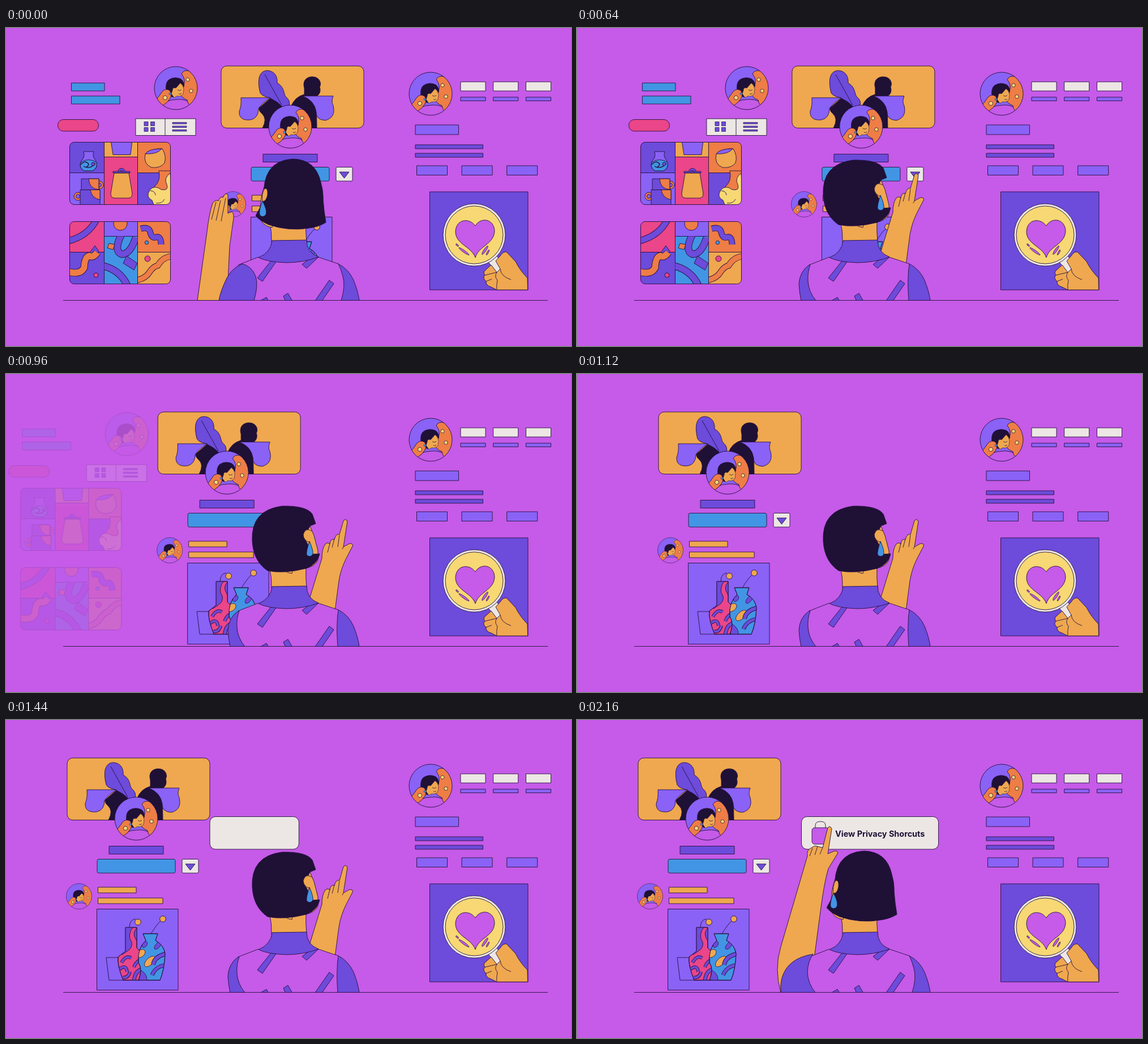
An HTML page with a canvas that plays this animation: 998x561 px, repeating every 2.24 s.

```html
<!DOCTYPE html>
<html lang="en">
<head>
<meta charset="utf-8">
<title>Privacy shortcuts</title>
<style>
html, body { margin: 0; width: 100%; height: 100%; overflow: hidden; background: #c55be8; }
canvas { display: block; }
</style>
</head>
<body>
<canvas id="stage" width="998" height="561"></canvas>
<script>
const W = 998, H = 561, LOOP = 2240, STEP = 80;
const BG = '#c55be8', INK = '#26103f', NIGHT = '#1f1036', VIOLET = '#6d4bdb', LILAC = '#8a62f6',
  BLUE = '#4295e4', SKIN = '#efa84f', RUST = '#ee7d46', PINK = '#ea4689', CREAM = '#ece7e4', YELLOW = '#f7d874';

const stage = document.getElementById('stage').getContext('2d');
let g = stage;

// ---- drawing helpers ----
function paint(p, fill, line = 0.9) {
  if (fill) { g.fillStyle = fill; g.fill(p); }
  if (line) { g.strokeStyle = INK; g.lineWidth = line; g.stroke(p); }
}
const shape = (d, fill, line) => paint(new Path2D(d), fill, line);
function box(x, y, w, h, fill, r = 0, line) {
  const p = new Path2D();
  p.roundRect(x, y, w, h, r);
  paint(p, fill, line);
}
function disc(x, y, r, fill, line) {
  const p = new Path2D();
  p.arc(x, y, r, 0, 7);
  paint(p, fill, line);
}
function oval(x, y, rx, ry, turn, fill) {
  const p = new Path2D();
  p.ellipse(x, y, rx, ry, turn, 0, 7);
  paint(p, fill, 0.8);
}
function band(d, w, fill) {
  const p = new Path2D(d);
  g.strokeStyle = INK; g.lineWidth = w + 1.8; g.stroke(p);
  g.strokeStyle = fill; g.lineWidth = w; g.stroke(p);
}
function group(dx, dy, draw) {
  g.save();
  g.translate(dx, dy);
  draw();
  g.restore();
}
function inside(p, draw) {
  g.save();
  g.clip(p);
  draw();
  g.restore();
}
function rounded(x, y, w, h, r) {
  const p = new Path2D();
  p.roundRect(x, y, w, h, r);
  return p;
}

// ---- motion helpers ----
const ramp = (t, a, b) => Math.min(1, Math.max(0, (t - a) / (b - a)));
const smooth = u => u < 0.5 ? 4 * u ** 3 : 1 - 4 * (1 - u) ** 3;
const ease = (t, a, b) => smooth(ramp(t, a, b));
function mix(a, b, k) {
  const nums = b.match(/[\d.]+/g);
  let i = 0;
  return a.replace(/[\d.]+/g, n => (+n + (nums[i++] - n) * k).toFixed(2));
}

// ---- scenery ----
function avatar(x, y, r = 38) {
  g.save();
  g.translate(x, y);
  g.scale(r / 38, r / 38);
  const ring = new Path2D();
  ring.arc(0, 0, 38, 0, 7);
  paint(ring, LILAC, 0);
  inside(ring, () => {
    shape('M-34 40 Q-22 20 2 20 Q26 18 34 40Z', BG);
    shape('M10 -25 Q14 -33 24 -30 Q36 -30 42 -18 L42 20 Q36 34 30 33 Q22 32 20 21 Q10 17 8 10 L14 -4 Q18 -16 10 -25Z', RUST);
    shape('M-17 4 Q-19 -10 -12 -15 Q-2 -21 9 -16 Q16 -10 14 -2 L4 0 Q0 6 -4 16 Q-14 14 -17 4Z', NIGHT);
    shape('M-6 4 Q-6 -2 0 0 L8 -9 Q14 -4 14 2 L13 10 Q9 16 2 14 L-3 17 L-8 10Z', SKIN, 0.6);
    shape('M3 3 Q6 6 10 3 M5 10 Q8 12 10 9', null, 0.8);
    shape('M-42 26 Q-30 17 -24 6 Q-18 0 -11 4 Q-6 10 -10 18 Q-18 32 -42 38Z', RUST);
    disc(-10, 10, 2, BLUE, 0.5);
    disc(21, -15, 3.2, YELLOW, 0.8);
    disc(27, 5, 3.2, YELLOW, 0.8);
    disc(-19, 17, 3.6, YELLOW, 0.8);
  });
  paint(ring, null);
  g.restore();
}

function pottery() {
  box(112.5, 201.5, 61, 54, VIOLET);
  box(112.5, 255.5, 61, 56, LILAC);
  box(173.5, 201.5, 59, 26, SKIN);
  box(173.5, 227.5, 59, 84, PINK);
  box(232.5, 201.5, 58, 54, RUST);
  box(232.5, 255.5, 58, 56, VIOLET);
  shape('M137 218 L155 218 Q152 227 158 233 Q165 246 153 252 L138 252 Q127 246 133 234 Q140 228 137 218Z', LILAC);
  shape('M132 237 Q146 228 160 237 Q162 247 153 252 L138 252 Q129 247 132 237Z', BLUE);
  shape('M132 241 Q140 232 146 240 Q144 248 137 244 Q148 250 158 239', null, 1.4);
  disc(154, 240, 3, VIOLET);
  disc(127, 297, 7, RUST);
  disc(127, 297, 3.5, LILAC);
  disc(165, 277, 7, RUST);
  disc(165, 277, 3.5, LILAC);
  box(131, 285.5, 35, 27, VIOLET);
  box(133, 266, 31, 19.5, VIOLET);
  shape('M164 266 L164 285 Q147 284 146 266Z', RUST);
  shape('M166 285.5 L149 285.5 Q151 300 166 303Z', RUST);
  shape('M185 198 L223 198 L220 223.5 L189 223.5Z', LILAC);
  disc(204, 254, 6.5, VIOLET);
  disc(204, 255, 3.5, PINK);
  shape('M191 256 L217 256 L223 292 Q223 300 216 300 L192 300 Q185 300 185 292Z', SKIN);
  box(189, 253, 30, 2.5, VIOLET);
  shape('M246 222 Q258 212 276 213 Q284 226 280 238 Q272 248 257 246 Q242 240 246 222Z', SKIN);
  shape('M246 222 Q252 213 275 213 Q268 223 246 222Z', LILAC);
  shape('M270 252 Q274 270 262 280 Q268 292 292 290 L292 252Z', RUST);
  shape('M290 256 Q278 265 284 276 Q288 288 274 285 Q262 276 254 286 Q246 298 258 304 L262 314 L294 314Z', YELLOW);
  shape('M255 287 Q264 288 264 295 M265 309 Q276 310 280 302', null);
}

function patterns() {
  box(112.5, 341.5, 61, 54, PINK);
  box(112.5, 395.5, 61, 57, VIOLET);
  box(173.5, 341.5, 59, 26, LILAC);
  box(173.5, 367.5, 59, 85, BLUE);
  box(232.5, 341.5, 58, 54, RUST);
  box(232.5, 395.5, 58, 57, SKIN);
  inside(rounded(112.5, 341.5, 60.5, 54, 0), () => band('M108 376 Q145 368 161 336', 10, VIOLET));
  inside(rounded(112.5, 380, 60.5, 80, 0), () => {
    shape('M146 399 L157 384 L164 394 L158 404Z', VIOLET);
    band('M110 430 Q131 436 138 423 Q139 404 147 402 Q154 406 161 396', 11, RUST);
    disc(159, 436, 4, PINK);
  });
  inside(rounded(173.5, 341.5, 59, 26, 0), () => disc(202, 345, 12, RUST));
  inside(rounded(173.5, 367.5, 59, 90, 0), () => {
    band('M205 362 Q189 393 204 399 Q219 400 229 370', 11, VIOLET);
    band('M168 419 Q203 426 216 458', 11, VIOLET);
    shape('M213 402 L232 415 L226 427 L207 415Z', VIOLET);
    shape('M182 380 L192 382 L189 391 L179 388Z', RUST);
  });
  band('M238 354 Q253 350 255 361 Q258 372 265 369 Q274 367 274 382', 9, VIOLET);
  disc(248.5, 378.5, 3.2, BLUE);
  inside(rounded(233, 396, 58, 60, 0), () => {
    band('M230 445 Q247 442 254 430 Q260 421 268 419 Q278 403 294 403', 9, RUST);
    disc(250, 407, 5, PINK);
  });
}

function leftPanel() {
  box(115.5, 97, 58.5, 14, BLUE);
  box(115.5, 120, 85.5, 14, BLUE);
  avatar(300, 106);
  box(91.5, 161.5, 72, 20.5, PINK, 10);
  box(229, 160, 106, 29.5, CREAM);
  shape('M281 160 V189', null);
  for (const x of [244, 255.5]) for (const y of [165.5, 175.5]) box(x, y, 7, 7, VIOLET, 0, 0.7);
  for (const y of [166.5, 173, 179.5]) box(294, y, 25, 2.6, VIOLET, 0, 0.7);
  for (const [y, art] of [[201.5, pottery], [341.5, patterns]]) {
    const frame = rounded(112.5, y, 178, 110, 8);
    inside(frame, art);
    paint(frame, null);
  }
}

function vases() {
  shape('M177 419 L203 419 L214 459 L182 459Z', LILAC);
  shape('M218 366 Q218 352 229 351 M256 377 Q268 358 273 355', null);
  disc(233, 356.5, 5.3, SKIN);
  disc(277, 351, 5.3, SKIN);
  const pink = new Path2D('M211 366 L231 366 L231 402 Q242 412 242 422 L235 459 L207 459 Q196 432 198 418 L211 408Z');
  paint(pink, PINK);
  inside(pink, () => {
    shape('M208 364 L225 364 Q213 380 222 392 Q224 402 214 408 L205 414Z', VIOLET);
    shape('M234 364 L231 367 Q222 376 230 388 L234 394Z', VIOLET);
    band('M204 428 Q212 414 221 420', 4, VIOLET);
    band('M200 440 Q212 430 214 444', 4, VIOLET);
    band('M244 420 Q230 424 226 436', 4, VIOLET);
    band('M206 454 Q216 456 219 444', 4, VIOLET);
    band('M240 440 Q228 442 226 460', 5, VIOLET);
  });
  paint(pink, null);
  const blue = new Path2D('M242 377 L268 377 L264 389 Q278 396 281 412 Q280 440 272 459 L234 459 Q242 440 234 428 Q232 402 247 389Z');
  paint(blue, BLUE);
  inside(blue, () => {
    oval(245, 396, 4, 6, 0.6, VIOLET);
    oval(268, 398, 4, 8, 0.7, VIOLET);
    oval(238, 412, 6, 9, 0.9, SKIN);
    oval(254, 426, 6, 12, 0.8, SKIN);
    band('M286 412 Q262 416 260 432', 6, VIOLET);
    band('M284 432 Q264 434 258 450', 5, VIOLET);
    oval(240, 452, 7, 12, -0.6, VIOLET);
  });
  paint(blue, null);
}

function centerPanel() {
  box(380, 67, 252, 109.5, SKIN, 10);
  shape('M448 110 C443 86 450 75 462 75 C476 76 480 88 479 97 C492 104 490 115 494 121 Q503 128 500 138 L485 142 Q470 133 466 123 Q448 120 448 110Z', VIOLET);
  shape('M457 82 L487 136', null);
  shape('M467 124 Q480 130 487 138 L500 176.5 L453 176.5 Q462 160 452 151 Q446 146 447 141Z', NIGHT);
  shape('M527 106 C523 92 532 86 541 86 C554 86 558 98 554 104 C557 112 553 118 548 121 L549 176.5 L500 176.5 L503 140 Q509 122 527 117Z', NIGHT);
  shape('M415 123 L467 123 Q452 133 446 142 Q446 159 432 162 Q411 164 412 147 Q416 138 415 123Z', LILAC);
  shape('M524 120 L578 120 Q574 130 578 137 Q583 158 564 163 Q547 162 548 148 Q545 128 524 120Z', LILAC);
  avatar(502, 174);
  box(454, 222.5, 96, 14, VIOLET);
  box(433, 245.5, 138, 24.5, BLUE, 3);
  box(583, 245.5, 29, 24.5, CREAM, 2);
  shape('M589 254 H606 L597.5 265Z', VIOLET);
  avatar(401, 311, 22.5);
  box(434.5, 295, 67.5, 10, SKIN);
  box(434.5, 314, 114.5, 10, SKIN);
  box(432.5, 333.5, 143.5, 143, LILAC);
  group(272, 0, vases);
}

function rightPanel() {
  avatar(750, 116);
  for (const x of [803, 860.7, 918.5]) {
    box(x, 95, 44, 16, CREAM);
    box(x, 122, 44, 6.5, LILAC);
  }
  box(723, 171, 76.5, 17, LILAC);
  box(723, 206, 119.5, 7, VIOLET);
  box(723, 221, 119.5, 7, VIOLET);
  for (const x of [725.5, 805, 884.7]) box(x, 243, 54, 16.5, LILAC);
  box(748.5, 289, 173.5, 173, VIOLET);
  shape('M852 413 L865 400 L880 418 L867 432Z', CREAM);
  disc(827, 365, 55, CREAM);
  disc(827, 365, 51, YELLOW);
  shape('M829 405 C822 385 794 382 794 359 C795 337 818 334 829 349 C838 333 862 336 863 358 C862 382 835 384 829 405Z', BG);
  oval(809, 394, 1.8, 11, -0.95, BG);
  oval(797, 383, 1.3, 3, -0.8, BG);
  oval(846, 392, 2, 9, 0.6, BG);
  oval(851, 396, 1.3, 5, 0.5, BG);
  shape('M884 395 Q878 394 873 402 L865 411 L873 425 L867 431 L857 418 L847 427 Q842 431 846 436 Q841 441 848 447 Q847 454 857 457 L867 462 L921.5 462 L921 441 Q908 428 900 412Z', SKIN);
  shape('M846 436 L867 431 Q862 438 868 445 M848 447 L858 443 M868 445 Q866 455 867 462 M873 425 Q874 438 892 444', null);
}

// ---- pop-up ----
function popup(t) {
  if (t < 1280) return;
  const open = 1 - (1 - ramp(t, 1280, 1660)) ** 1.92;
  g.save();
  g.globalAlpha = ramp(t, 1240, 1360);
  box(396.5 - 104 * (1 - open), 170.5, 242 * open, 57.5, CREAM, Math.min(10, 121 * open));
  g.globalAlpha = ramp(t, 1520, 1680);
  shape('M421 191 V186 Q421 179 430 179 Q439 179 439 186 V191', CREAM);
  box(415, 190, 30, 29, BG, 5);
  g.fillStyle = NIGHT;
  g.font = '700 14.4px Inter, sans-serif';
  g.fillText('View Privacy Shorcuts', 456, 206);
  g.restore();
}

// ---- woman ----
const HAIR = {
  left: 'M456 304 Q450 234 507 231 Q547 232 556 272 L559 285 L560 295 Q560 305 561 312 Q562 325 564 336 L565 343 Q552 351 535 353 Q500 359 464 347 Q448 340 441 331Z',
  right: 'M435 295 Q432 240 488 233 Q530 232 541 247 L547 264 L537 268 Q530 280 528 292 Q534 300 540 318 L554 317 Q551 335 530 343 Q490 353 462 347 Q437 330 435 295Z'
};
const SLEEVE = {
  hold: 'M417 416 Q395 425 385 452 Q378 468 376 481 L438 481 Q446 455 441 438 Q434 420 417 416Z',
  turned: 'M410 418 Q393 430 392 452 Q393 468 396 481 L422 481 Q409 465 408 447 Q407 430 412 418Z',
  reach: 'M414 414 Q372 420 366 452 Q363 468 367 481 L420 481 Q408 465 407 445 Q407 425 414 414Z',
  press: 'M417 413 Q372 420 362 455 Q358 470 361 481 L421 481 Q408 465 407 445 Q408 425 417 413Z',
  right: 'M587 416 Q605 425 614 445 Q622 465 624 481 L592 481 Q600 455 595 438 Q592 426 587 416Z',
  rightTurned: 'M587 416 Q605 425 614 445 Q622 465 624 481 L586 481 Q584 455 585 440 Q585 428 587 416Z'
};
const ARM = {
  hold: 'M338 481 L355 360 Q359 326 365 309 Q370 302 375 305 Q379 296 383 299 Q388 289 392 294 L392 312 L392 327 L399 324 Q404 328 401 342 L395 385 L393 425 L391 481Z',
  holdLines: 'M363 338 L371 307 M371 340 L379 304 M380 341 L388 300',
  reach: 'M376 435 Q378 425 382 405 L428 240 Q430 230 435 220 L445 210 L455 214 L462 203 Q467 199 468 206 L463 246 L468 236 Q476 232 474 240 L456 275 Q451 290 450 330 L443 405Z',
  press: 'M360 481 Q348 440 360 400 L407 240 Q405 230 413 226 L420 222 L434 225 L443 190 Q447 185 450 192 L443 236 L455 231 Q462 231 460 236 L444 262 Q437 285 431 330 L419 420Z',
  reachLines: 'M436 240 L445 214 M446 244 L456 214 M455 246 L464 220',
  pressLines: 'M411 240 L416 226 M420 238 L425 223 M429 237 L434 225',
  point: 'M535 400 L558 325 Q558 308 564 300 Q568 296 572 300 Q573 290 580 292 Q583 281 589 283 L596 259 Q600 254 603 260 L596 305 L607 299 Q614 299 612 304 L601 325 Q591 345 588 365 L581 418 L560 425Z',
  pointLines: 'M568 315 L572 299 M576 306 L580 291 M586 305 L589 284 M596 305 L594 309'
};

function leftEar() {
  shape('M457 283 Q463 282 462 294 Q460 306 453 306 Q451 292 457 283Z', SKIN);
  shape('M453 305 Q462 322 459 329 Q455 335 449 331 Q445 326 453 305Z', BLUE);
}
function rightEar() {
  shape('M540 277 Q529 270 525 283 Q525 293 536 297', SKIN);
  shape('M536 295 Q543 311 542 318 Q537 325 531 319 Q530 313 536 295Z', BLUE);
}

function head(k) {
  const toLeft = () => group(k * 60, 0, leftEar);
  const toRight = () => group((k - 1) * 60, 0, rightEar);
  group(k * 35, 0, () => shape('M458 275 Q450 295 450 310 L446 330 Q452 350 470 352 L480 300Z', SKIN));
  group((k - 1) * 45, 0, () => shape('M535 264 L544 285 L551 312 L551 328 Q546 340 528 343 L520 290Z', SKIN));
  if (k >= 0.25) toLeft();
  if (k <= 0.75) toRight();
  shape(mix(HAIR.left, HAIR.right, k), NIGHT);
  if (k < 0.25) toLeft();
  if (k > 0.75) {
    toRight();
    shape('M526 240 Q538 250 540 266', null);
  }
}

function woman(t) {
  const first = t < 1200;
  const k = first ? ease(t, 80, 580) : 1 - ease(t, 1440, 1800);
  const press = ease(t, 1840, 2160);
  const leftDown = first ? ease(t, 0, 340) : 1 - ease(t, 1560, 1840);
  const rightUp = first ? ease(t, 220, 620) : 1 - ease(t, 1440, 1700);

  g.save();
  g.beginPath();
  g.rect(0, 0, W, 481);
  g.clip();
  if (leftDown < 1) group(leftDown * 15, leftDown * 290, () => {
    shape(first ? ARM.hold : mix(ARM.reach, ARM.press, press), SKIN);
    shape(first ? ARM.holdLines : mix(ARM.reachLines, ARM.pressLines, press), null);
  });
  if (rightUp > 0) group((rightUp - 1) * 40, (1 - rightUp) * 210, () => {
    shape(ARM.point, SKIN);
    shape(ARM.pointLines, null);
  });

  shape('M446 404 L410 418 L406 450 L410 481 L596 481 L596 440 L587 416 L551 404Z', BG, 0);
  shape('M446 404 L410 418 M551 404 L587 416', null);
  shape('M468 411 L478 411 L453 447 L444 441Z', VIOLET);
  shape('M523 417 L540 404 L552 404 L531 424Z', VIOLET);
  shape('M571 445 L579 451 L557 483 L546 481Z', VIOLET);
  shape('M490 473 L498 468 L506 482 L494 482Z', VIOLET);
  shape('M448 482 L460 475 L464 482Z', VIOLET);
  const raised = first ? SLEEVE.hold : mix(SLEEVE.reach, SLEEVE.press, press);
  shape(mix(raised, SLEEVE.turned, k), VIOLET);
  shape(mix(SLEEVE.right, SLEEVE.rightTurned, k), VIOLET);
  shape('M465 340 Q470 360 469 378 L531 378 Q529 360 530 338Z', SKIN);
  shape('M470 375 L531 374 Q531 396 552 404 Q525 414 495 414 Q462 413 446 405 Q468 396 470 375Z', VIOLET);
  head(k);
  g.restore();
}

// The left panel fades as one layer, so it is drawn once apart.
const layer = document.createElement('canvas');
layer.width = W;
layer.height = H;
g = layer.getContext('2d');
leftPanel();
g = stage;

function draw(t) {
  g.fillStyle = BG;
  g.fillRect(0, 0, W, H);
  const slide = ease(t, 604, 1364);
  const fade = 1 - ramp(t, 700, 1010);
  if (fade > 0) {
    g.globalAlpha = fade;
    g.drawImage(layer, -211 * slide, 0);
    g.globalAlpha = 1;
  }
  rightPanel();
  popup(t);
  group(-272 * slide, 0, centerPanel);
  woman(t);
  shape('M101 480.5 H957', null);
}

const start = performance.now();
function tick() {
  const t = (performance.now() - start) % LOOP;
  draw(Math.floor(t / STEP) * STEP);
  requestAnimationFrame(tick);
}
tick();
</script>
</body>
</html>
```
